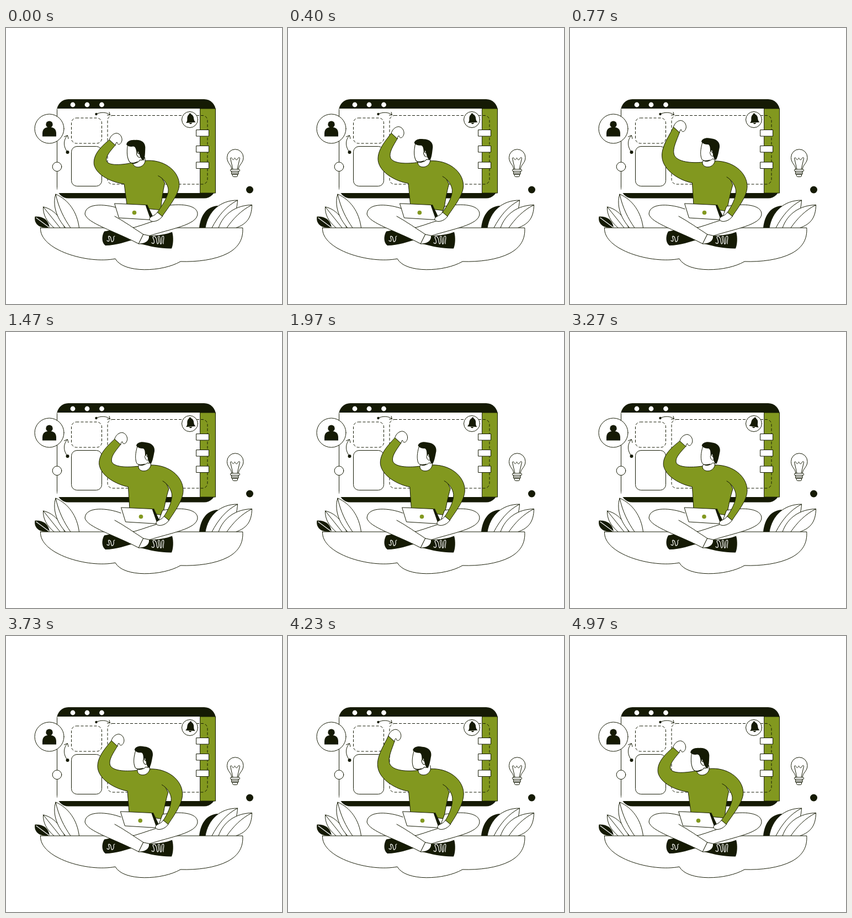
An HTML page that plays this animation: 500 by 500 pixels, repeating every 5 s.

```html
<!DOCTYPE html>
<html lang="en">
<head>
<meta charset="utf-8">
<title>Strong worker</title>
<style>
html, body { margin: 0; width: 100%; height: 100%; overflow: hidden; background: #fff; }
svg { display: block; width: 100vw; height: 100vh; }
.line { fill: none; stroke: #151a04; stroke-width: 1; stroke-linejoin: round; stroke-linecap: round; }
.white { fill: #fff; }
.green { fill: #82981f; }
.dark { fill: #151a04; }
.lace { fill: none; stroke: #fff; stroke-width: 1.2; stroke-linecap: round; stroke-linejoin: round; }
.dash { stroke-dasharray: 5 3; stroke-linecap: butt; }
</style>
</head>
<body>
<svg viewBox="0 0 500 500">
  <!-- window -->
  <rect class="dark" x="92" y="129" width="288" height="179.5" rx="21"/>
  <rect class="white" x="93" y="146" width="286" height="153"/>
  <path class="line green" d="M352 146H379.5V299H352Z"/>
  <g class="white">
    <circle cx="121" cy="139" r="4.4"/><circle cx="147" cy="139" r="4.4"/><circle cx="173.5" cy="139" r="4.4"/>
  </g>
  <g class="line">
    <rect class="dash" x="118.5" y="163" width="55" height="46" rx="9"/>
    <rect class="dash" x="184" y="158.5" width="181" height="124.5" rx="9"/>
    <rect x="118.5" y="214.5" width="55" height="72" rx="10"/>
    <path d="M163 156C172 152 181 152 188 157M187 152.5L188.5 157.5L183.500 158"/>
    <path d="M111.500 225C103 214 104 203 111 195M105.500 197L111.500 194.500L113 200.500"/>
  </g>
  <circle class="dark" cx="163.500" cy="156" r="2.2"/>
  <circle class="dark" cx="111.500" cy="225" r="3"/>
  <g class="line white">
    <rect x="345" y="184.500" width="22.500" height="11.500"/>
    <rect x="345" y="213.500" width="22.500" height="11.500"/>
    <rect x="345" y="243" width="22.500" height="11.500"/>
    <circle cx="333" cy="166" r="14.500"/>
    <circle cx="78.500" cy="182.500" r="26.500"/>
    <circle cx="92.500" cy="251.300" r="8.300"/>
  </g>
  <g id="bell" class="dark">
    <path d="M325.500 171.500C329 168 328 165 328.500 162C329.500 158 331 157 332 156.500A2 2 0 0 1 336 156.500C338 157 339.500 159 340 162C340.500 166 340 168 343 171.500Z"/>
    <path d="M331.500 172H336.500A2.500 2 0 0 1 331.500 172Z"/>
  </g>
  <circle class="dark" cx="78.500" cy="174.700" r="6.200"/>
  <path class="dark" d="M66 196.500V191C66 183 71 179.500 78.500 179.500S91 183 91 191V196.500Z"/>

  <!-- bulb and dot -->
  <g class="line white">
    <path d="M409 256C408 247 400.500 245 400.500 234.500A14.700 14.700 0 0 1 430 234.500C430 245 422 247 421 256Z"/>
    <path d="M411 256L406.500 236C409 232 410 240 412 238.500S414 234 415 236S417 240 419 238S422 232 423.500 236L419 256"/>
    <rect x="406.500" y="256" width="17" height="3.500" rx="1.500"/>
    <path d="M409 259.500H421V265H409ZM410.500 265H419.500V268Q419 269.500 417 269.500H413Q411 269.500 410.500 268Z"/>
    <path d="M409 262.300H421"/>
  </g>
  <circle class="dark" cx="441.500" cy="293" r="6.500"/>

  <!-- leaves -->
  <path class="dark" d="M79 361.500C60 364 50 354 52.500 341.500C68 341 77 348 79 361.500Z"/>
  <path class="lace" d="M55 344L78 361"/>
  <path class="dark" d="M350 362C353 337 365 323 384 322L375 338L362 362Z"/>
  <g class="line white">
    <path d="M87 362C73 350 67 338 67.500 324C85 328 99 342 106 362M67.500 324L98 362"/>
    <path d="M108 362C91 344 84 320 90 301C113 311 129 333 132.500 362M90 301C95 325 105 345 117 362"/>
    <path d="M361 362C366 332 388 312 419.500 312C418 338 408 352 388 362M419.500 312C398 323 384 341 373 362"/>
    <path d="M385 362C394 336 417 321 445.500 320.500C445 344 436 355 417 362M445.500 320.500C426 330 411 346 400 362"/>
  </g>
  <path class="line white" d="M62.500 362H428.800C430 382 422 397 402 408C379 420 346 424 316 423C284 442 213 445 198 418C148 428 60 402 62.500 362Z"/>

  <!-- figure -->
  <path id="torso" class="line green"/>
  <path id="neck" class="line white"/>
  <path id="fist" class="line white" d="M-5.500 -5C-4 -11 2 -17 8.500 -16.500C16 -15 19 -6 16.500 -1C14 5 9 5 8.500 0C6 0 6 3 5.500 5Z"/>
  <g id="head">
    <path class="line white" d="M240 207C236 220 235.500 231 239 238C243 243 254 242 258 237L262 238L263 222L254 209Z"/>
    <path class="dark" d="M240.500 239C245 240.500 249 240 254 238.500C251 242.500 245 243.500 240.500 239Z"/>
    <path class="dark" d="M238 206C239 200 247 198 255 200C267 201 272 208 271 216C269 226 268 233 264.500 239C260.500 237 259 232 258.500 227L257 221L254 225C254 218 254 212 250 211C245 211 241 210 238 206Z"/>
    <path class="line white" d="M258 226C255 221 252.500 224 254 228C255 231 257 233 259 232"/>
  </g>

  <path class="dark" d="M178 368.500C173 377 173 389 180 394C200 394 217 387 236 382L196 365Z"/>
  <path class="lace" d="M183 385C187 389 188 384 186 380S189 376 190 381S191 389 194 386S193 377 197 377"/>
  <path class="line white" d="M284 323C315 317 347 320 347 337C346 357 298 364 258 377L236 386L217 365C238 361 256 353 274 348Z"/>
  <path class="line white" d="M208 328C185 319 144 315 143 337C147 354 195 367 240.500 391L249 374C232 363 215 351 197 341"/>
  <path class="line white" d="M249 374L261 376.500L259 391L240.500 391Z"/>
  <path class="dark" d="M259 376.500C275 376 290 374 301 369.500C304 379 303 393 300 399.500C282 400 261 396 243 390.500C254 390 260 384 259 376.500Z"/>
  <path class="lace" d="M264 389C268 393 270 388 267 382S270 376 272 381S273 394 276 390S273 377 277 377S278 394 281 391S280 378 284 377S284 388 285 391"/>

  <path id="arm" class="line green"/>
  <g id="laptop">
    <path class="line white" d="M208 318L264 320.500L273.500 347.500L216 344Z"/>
    <path class="dark" d="M264 320.500L267 320L276.500 340L273.500 347.500Z"/>
    <circle class="green" cx="243.500" cy="334.500" r="3.800"/>
    <path class="line white" d="M285 334C281 341 271 341 271 346C271 353 287 352 294 341.500Z"/>
  </g>
</svg>
<script>
const LOOP = 5000;
const PUMP = LOOP / 3;
const times = [0, 770, 1470, 2470, 3270, 4230, LOOP];
const el = Object.fromEntries([...document.querySelectorAll('[id]')].map(n => [n.id, n]));

// Arm outline: outer edge from cuff to waist, then inner edge from collar back to cuff.
const bentArm = [[200, 199], [186, 209], [168, 223], [169.5, 242], [173, 262], [200, 276], [221.500, 280.500],
  [240, 243], [225, 245], [199, 247], [193, 238], [190, 229], [200, 220], [211, 208.500]];
const raisedArm = [[186.500, 177.500], [179, 195], [165, 214], [166.500, 233], [168, 258], [200, 277], [221.500, 280.500],
  [240, 243], [222, 245], [192, 243], [188, 228], [185, 217], [193, 202], [197.500, 187.500]];

const mix = (a, b, k) => a + (b - a) * k;

function keyed(t, values) {
  let i = 0;
  while (i < times.length - 2 && t >= times[i + 1]) i++;
  const k = (t - times[i]) / (times[i + 1] - times[i]);
  return mix(values[i], values[i + 1], (1 - Math.cos(Math.PI * k)) / 2);
}

// The upper body leans to the left around the hips.
function leaner(amount) {
  const a = -4 * amount * Math.PI / 180, c = Math.cos(a), s = Math.sin(a);
  return ([x, y]) => {
    const dx = x - 250, dy = y - 330;
    return [250 + dx * c - dy * s - 4 * amount, 330 + dx * s + dy * c];
  };
}

const text = points => points.map(p => p.map(v => v.toFixed(2)).join(' ')).join(' ');

function draw(t) {
  const lean = leaner(1 - keyed(t, [0, 1, 1, 0.8, 1, 0.6, 0]));
  const slide = keyed(t, [-11, 0, 1, -3, -0.5, 0, -11]);
  const raise = 1 - Math.abs(1 - 2 * (t % PUMP) / PUMP);
  const at = (...points) => text(points.map(lean));
  const held = (x, y) => [x + slide, y];

  const arm = bentArm.map((p, i) => lean(p.map((v, j) => mix(v, raisedArm[i][j], raise))));
  const part = (from, to) => text(arm.slice(from, to));
  el.torso.setAttribute('d',
    `M${part(0, 1)}C${part(1, 7)}L${at([224, 322], [284, 332])}` +
    `C${at([288, 312], [290, 300], [295, 284])}L${at([284, 262], [262, 241])}` +
    `L${part(7, 8)}C${part(8, 14)}Z`);
  el.neck.setAttribute('d',
    `M${at([243, 237], [240, 243])}C${at([239, 254], [259, 256], [262.5, 241])}L${at([262, 235])}`);

  const cuff = [0, 1].map(j => (arm[0][j] + arm[13][j]) / 2);
  el.fist.setAttribute('transform', `translate(${text([cuff])})`);

  el.arm.setAttribute('d',
    `M${at([262, 241])}C${at([295, 240], [321, 262], [321, 287])}` +
    `C${at([321, 305])} ${text([held(304, 326), held(293.5, 342)])}` +
    `L${text([held(284.5, 335)])}C${text([held(292, 324)])} ${at([301, 308], [300.500, 295])}` +
    `C${at([300, 286], [293, 275], [284, 270])}`);

  const headX = keyed(t, [-17.5, 0, -2, -3, 0.7, -11.5, -17.5]);
  const headY = keyed(t, [3, 0, 0, 0, 0, 0.7, 3]);
  const nod = keyed(t, [-9, 0, 0, 0, 0, -1, -9]);
  el.head.setAttribute('transform', `translate(${headX} ${headY}) rotate(${nod} 253 222)`);
  el.laptop.setAttribute('transform', `translate(${slide})`);
  const swing = keyed(t, [-4, -4, -4, 12, 10, -4, -4]);
  el.bell.setAttribute('transform', `rotate(${swing} 334 164)`);
}

const start = performance.now();
function tick() {
  draw((performance.now() - start) % LOOP);
  requestAnimationFrame(tick);
}
tick();
</script>
</body>
</html>
```
